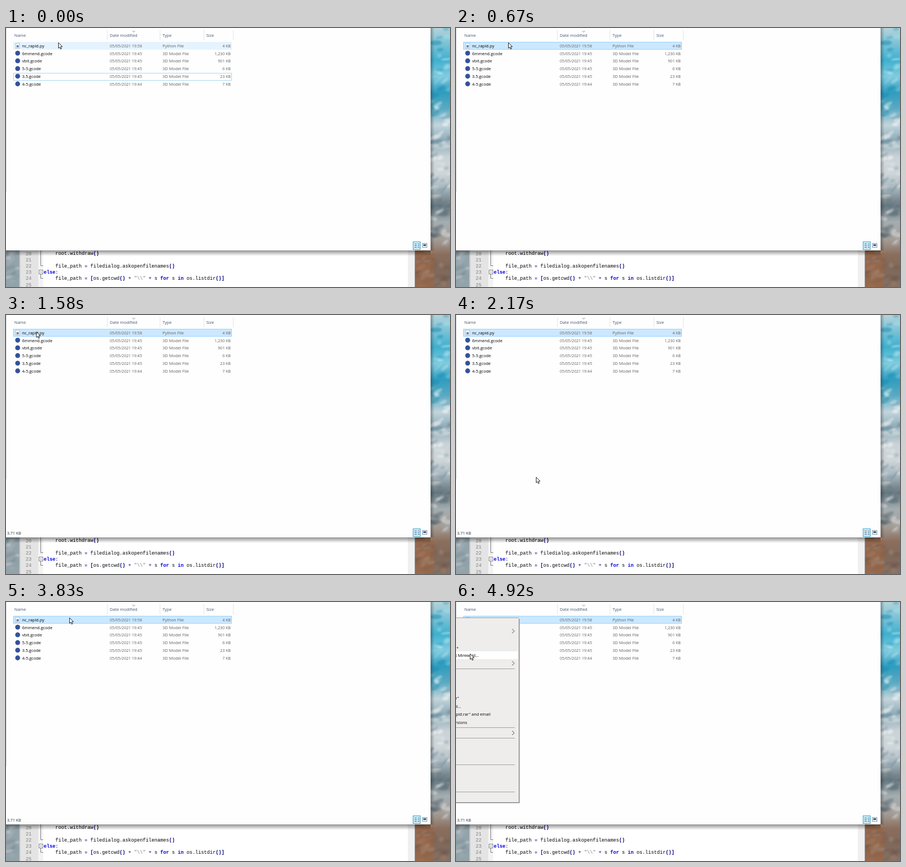
An HTML page with a canvas that plays this animation: 800 px wide and 467 px high, repeating every 5.01 s.

```html
<!DOCTYPE html>
<html lang="en">
<head>
<meta charset="utf-8">
<title>File list</title>
<style>
html, body { margin: 0; width: 100%; height: 100%; overflow: hidden; background: #fff; }
canvas { display: block; }
</style>
</head>
<body>
<canvas id="stage" width="800" height="467"></canvas>
<script>
const W = 800, H = 467, LOOP = 5010, TICK = 83.4, ROW = 13.85;
const UI = '"Open Sans", "Noto Sans", sans-serif';
const MONO = '"Liberation Mono", monospace';
const stage = document.getElementById('stage').getContext('2d');
const scene = document.createElement('canvas');
scene.width = W;
scene.height = H;
let g = scene.getContext('2d');

const files = [
  ['nc_rapid.py', '19:58', 'Python File', '4 KB'],
  ['6mmend.gcode', '19:45', '3D Model File', '1,230 KB'],
  ['vbit.gcode', '19:45', '3D Model File', '901 KB'],
  ['5-5.gcode', '19:45', '3D Model File', '6 KB'],
  ['3.5.gcode', '19:45', '3D Model File', '23 KB'],
  ['4-5.gcode', '19:44', '3D Model File', '7 KB']
];
// time, x, y of the pointer tip
const path = [
  [0, 94, 26], [670, 94, 26], [900, 62, 41], [1000, 72, 31], [1330, 68, 30],
  [1670, 52, 30], [1750, 52, 30], [2170, 144, 292], [2330, 144, 292],
  [2670, 116, 30], [3000, 112.5, 26], [3400, 112.5, 26], [3580, 114, 28],
  [4420, 114, 28], [4670, 52, 78], [4910, 25, 93]
];

let seed = 11;
const random = () => (seed = seed * 16807 % 2147483647) / 2147483647;

function rect(x, y, w, h, fill, stroke) {
  g.fillStyle = fill;
  g.fillRect(x, y, w, h);
  if (stroke) {
    g.strokeStyle = stroke;
    g.lineWidth = 1;
    g.strokeRect(x + .5, y + .5, w - 1, h - 1);
  }
}

function text(s, x, y, color, size = 7.5, align = 'left') {
  g.font = `${size}px ${UI}`;
  g.fillStyle = color;
  g.textAlign = align;
  g.fillText(s, x, y + 2.7);
}

function line(color, ...pts) {
  g.strokeStyle = color;
  g.lineWidth = 1;
  g.beginPath();
  for (let i = 0; i < pts.length; i += 2) g.lineTo(pts[i], pts[i + 1]);
  g.stroke();
}

function shade(x, y, w, h, down, alpha) {
  const fade = g.createLinearGradient(x, y, down ? x : x + w, down ? y + h : y);
  fade.addColorStop(0, `rgba(0,0,0,${alpha})`);
  fade.addColorStop(1, 'rgba(0,0,0,0)');
  rect(x, y, w, h, fade);
}

// soft slanted patches of water, foam or rock
function patches(n, x, y, w, h, colors, alpha) {
  g.save();
  g.beginPath();
  g.rect(x, y, w, h);
  g.clip();
  g.filter = 'blur(1.5px)';
  for (let i = 0; i < n; i++) {
    g.globalAlpha = alpha * (.4 + random() * .6);
    g.fillStyle = colors[i % colors.length];
    g.beginPath();
    g.ellipse(x + random() * w, y + random() * h, 4 + random() * 8, 1.5 + random() * 3,
      -.9 + random() * 1.2, 0, 7);
    g.fill();
  }
  g.restore();
}

function wallpaper() {
  const sea = g.createLinearGradient(765, 0, 785, H);
  ['#b5d3da', '#7cc3d6', '#3fb0cf', '#7fcbdf', '#2f9dbf', '#5aa9c2', '#c3d5dc', '#8ba9b6',
    '#c9d3d7', '#cfd6d9', '#a3b2ba', '#62757f', '#a4adb0', '#a5a19c', '#8b6e5c', '#80695a', '#857267']
    .forEach((c, i, all) => sea.addColorStop(i / (all.length - 1), c));
  rect(0, 0, W, H, sea);
  patches(24, 765, 0, 35, 160, ['#f0fafb', '#178db4', '#a8e2ee'], .55);
  patches(34, 765, 150, 35, 150, ['#f6f7f7', '#e6ebed', '#66889a'], .6);
  patches(28, 765, 300, 35, 95, ['#e8eaea', '#4b606b', '#98918a'], .5);
  rect(737, 401, 34, 66, '#94684d');
  patches(24, 737, 401, 63, 66, ['#775340', '#a67e64', '#a39b95', '#5f5048'], .45);
  rect(0, 401, 25, 66, '#93a3aa');
  patches(14, 0, 401, 25, 66, ['#d8dddf', '#748891', '#adb9be'], .5);
}

function code(s, x, y) {
  g.textAlign = 'left';
  for (const part of s.split(/(\b(?:for|in|else)\b|"[^"]*"|[^\w\s"]+)/)) {
    const word = /^(for|in|else)$/.test(part), quote = part[0] === '"';
    const sign = !quote && /^[^\w\s]/.test(part), bold = word || /^[()[\]]/.test(part);
    g.font = `${bold ? 'bold ' : ''}8.76px ${MONO}`;
    g.fillStyle = word ? '#0000e0' : sign ? '#000080' : quote ? '#808080' : '#000';
    g.fillText(part, x, y + 2.5);
    x += g.measureText(part).width;
  }
}

function editor() {
  rect(24, 401, 713, 66, '#fff');
  rect(24, 401, 2, 66, '#c9cccd');
  rect(26, 401, 32, 66, '#e4e4e4');
  rect(58, 401, 9, 66, '#f3f3f3');
  rect(724, 401, 13, 66, '#f0f0f0');
  rect(736, 401, 1, 66, '#b8b8b8');
  for (let i = 0; i < 6; i++) {
    g.font = `8.76px ${MONO}`;
    g.fillStyle = '#808080';
    g.textAlign = 'right';
    g.fillText(20 + i, 46, 409.5 + i * 11.2);
  }
  code('root.withdraw()', 89, 406.8);
  code('file_path = filedialog.askopenfilenames()', 89, 429);
  code('else:', 68, 440);
  code('file_path = [os.getcwd() + "\\\\" + s for s in os.listdir()]', 89, 451.2);
  line('#808080', 62.5, 401, 62.5, 428.5, 67, 428.5);
  line('#808080', 62.5, 444, 62.5, 451.5, 67, 451.5);
  rect(59, 436, 8, 8, '#fff', '#808080');
  line('#808080', 61, 440, 65, 440);
}

function explorer() {
  shade(765, 0, 7, 401, false, .3);
  shade(0, 401, 765, 10, true, .42);
  rect(0, 0, 765, 401, '#fefefe');
  rect(0, 0, 1, 296, '#d9d9d9');
  [['Name', 15], ['Date modified', 187], ['Type', 282], ['Size', 361]]
    .forEach(([s, x]) => text(s, x, 13, '#43566f'));
  [182, 277, 356, 409].forEach(x => rect(x, 4, 1, 18, '#e5e5e5'));
  line('#8a8a8a', 227.5, 5, 230, 7.5, 232.5, 5);
  rect(733, 385, 14, 15, '#cbeaf7', '#41a5cf');
  for (let y = 389; y < 398; y += 3) {
    rect(736, y, 4, 1, '#527286');
    rect(742, y, 3, 1, '#527286');
  }
  rect(750, 388, 9, 8, '#f5f8fa', '#8797a3');
  rect(752, 390, 5, 3, '#3c5b80');
}

function rows(selected, hover) {
  if (hover >= 0) rect(13, Math.round(25 + hover * ROW), 394, 14, '#e5f3ff');
  if (selected) rect(13, 25, 394, 14, '#cce8ff', '#99d1ff');
  else rect(13, 81, 394, 14, '#fefefe', '#a8d8f4');
  files.forEach(([name, time, type, size], i) => {
    const y = 32 + i * ROW;
    if (i) {
      g.fillStyle = '#35519a';
      g.beginPath();
      g.arc(21, y - .5, 4.4, 0, 7);
      g.fill();
    } else {
      rect(17, 27, 8, 10, '#fafafa', '#c0c0c0');
      rect(19, 31, 4, 4, '#5c8fbc');
    }
    text(name, 29, y, '#000');
    text('05/05/2021 ' + time, 187, y, '#606060', 7.15);
    text(type, 282, y, '#606060');
    text(size, 405, y, '#606060', 7.2, 'right');
  });
}

function tooltip() {
  rect(63, 56, 120, 33, 'rgba(0,0,0,.22)');
  rect(62, 55, 120, 33, 'rgba(0,0,0,.25)');
  rect(61, 54, 120, 33, '#fff', '#8a8a8a');
  ['Type: 3D Model File', 'Size: 1.20 MB', 'Date modified: 05/05/2021 19:45']
    .forEach((s, i) => text(s, 65, 60.2 + i * 9.6, '#666', 7.25));
}

function menu(alpha, y) {
  // the shadow stands at full strength while the panel fades in
  rect(113, 30, 1, 332, '#868686');
  rect(114, 31, 1, 332, '#bdbdbd');
  rect(0, 361, 114, 1, '#868686');
  rect(0, 362, 114, 1, '#bdbdbd');
  g.globalAlpha = alpha;
  rect(0, 28, 113, 333, '#eeedec');
  rect(0, 28, 113, 1, '#a0a0a0');
  if (y > 88 && y < 104) rect(0, 89, 112, 14, '#fff');
  [120, 226, 245, 293, 342].forEach(v => rect(0, v, 106, 1, '#a2a2a2'));
  [52.5, 110.5, 236].forEach(v => line('#444', 101, v - 4, 105, v, 101, v + 4));
  [['+', 5, 82], ['t Mirewald...', 41, 96.3], ['r"', 5.5, 173.3], ['il...', 9, 188],
    ['pid.rar" and email', 62, 202.5], ['rsions', 20, 217]]
    .forEach(([s, x, v]) => text(s, x, v, '#000', 7.4, 'right'));
  g.globalAlpha = 1;
}

function pointer(x, y) {
  g.save();
  g.translate(x, y);
  g.beginPath();
  [[.5, .5], [.5, 10.5], [2.8, 8.4], [4.3, 12], [6, 11.3], [4.5, 7.8], [7.6, 7.6]]
    .forEach(p => g.lineTo(...p));
  g.closePath();
  g.fillStyle = '#fff';
  g.fill();
  g.strokeStyle = '#111';
  g.lineWidth = .9;
  g.stroke();
  g.restore();
}

function pointerAt(t) {
  const i = path.findIndex(p => p[0] > t);
  if (i < 0) return path[path.length - 1].slice(1);
  const [t0, x0, y0] = path[i - 1], [t1, x1, y1] = path[i];
  const u = (t - t0) / (t1 - t0), k = u * u * (3 - 2 * u);
  return [x0 + (x1 - x0) * k, y0 + (y1 - y0) * k];
}

function draw(now) {
  // every sixth tick repeats the one before it
  let tick = Math.min(59, Math.floor((now % LOOP + 4) / TICK));
  if (tick % 6 === 3) tick--;
  const [x, y] = pointerAt(tick * LOOP / 60);
  const open = tick >= 52, row = Math.round((y - 32) / ROW);
  stage.drawImage(scene, 0, 0);
  rows(tick >= 5, !open && row < files.length ? row : -1);
  if (tick >= 11) text('3.71 KB', 2, 393, '#1c2a3c', 7.15);
  if (tick === 11 || tick === 12) tooltip();
  if (open) menu(Math.min(1, .25 + (tick - 52) * .25), y);
  pointer(x, y);
  requestAnimationFrame(draw);
}

wallpaper();
editor();
explorer();
g = stage;
requestAnimationFrame(draw);
</script>
</body>
</html>
```
